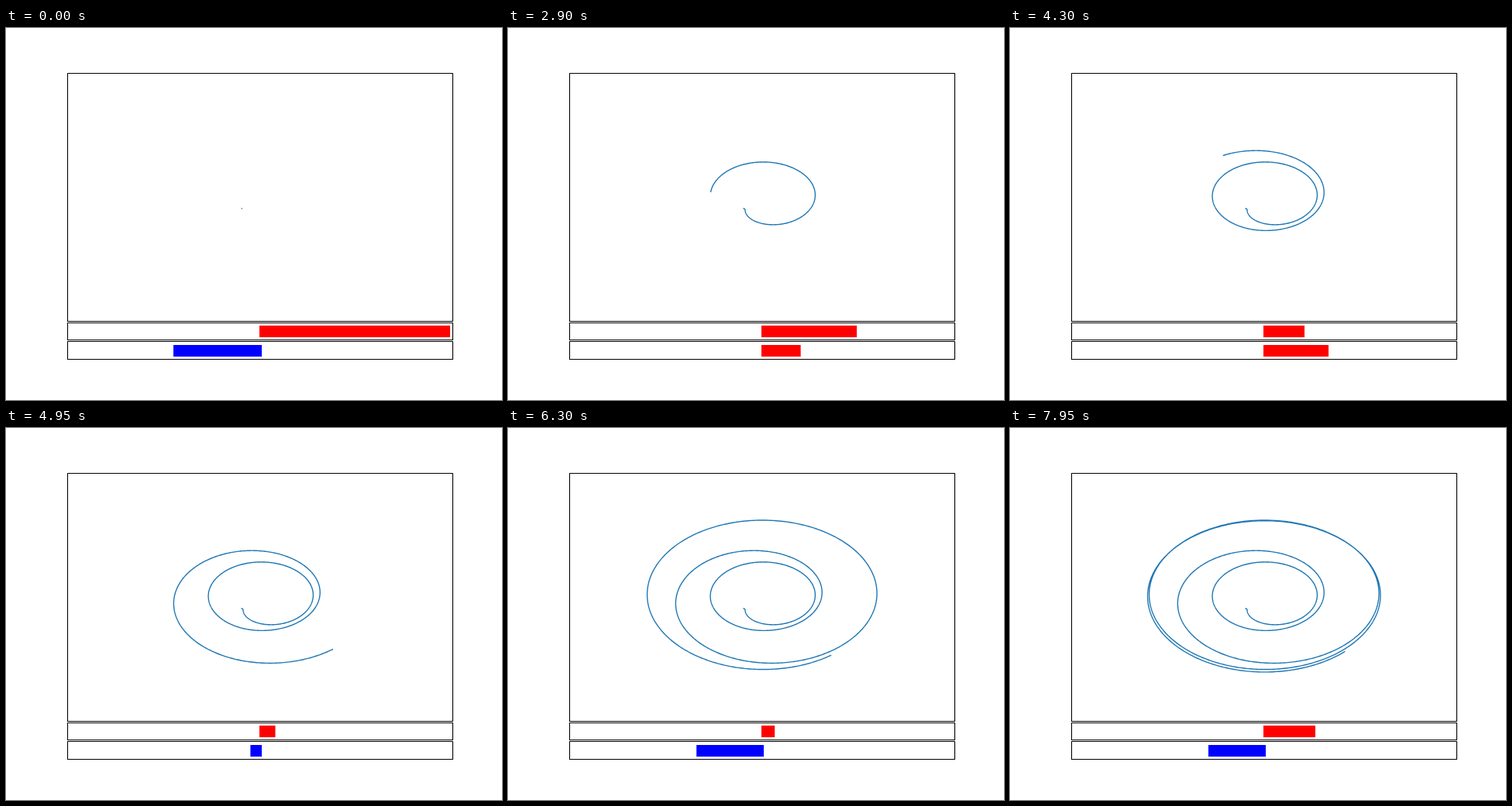
An HTML page with a canvas that plays this animation: 640x480 px, repeating every 8000 ms.

```html
<!DOCTYPE html>
<html lang="en">
<head>
<meta charset="utf-8">
<title>Spiral orbit with control bars</title>
<style>
  html, body { margin: 0; width: 100%; height: 100%; overflow: hidden; background: #fff; }
  canvas { display: block; }
</style>
</head>
<body>
<canvas id="stage" width="640" height="480"></canvas>
<script>
const ctx = document.getElementById('stage').getContext('2d');
const LOOP = 8000, STEP = 50;
const CX = 328, CY = 218, RX = 248, RY = 160;
const START = -136;      // angles are in degrees, counterclockwise
const SPIN = 222;        // cruising speed, degrees per second
const SPIN_UP = 3.04;    // seconds until cruising speed

// Bar ends: seconds, pixels from the zero line.
const topKeys = [[2, 243], [2.9, 120], [5.5, -10], [7.95, 64]];
const lowKeys = [[0, -111], [0.85, -89], [1.95, 25], [4.3, 81], [5.5, -90], [7.95, -71]];

const rad = deg => deg * Math.PI / 180;

function smooth(from, to, x) {
  const u = Math.min(1, Math.max(0, (x - from) / (to - from)));
  return u * u * (3 - 2 * u);
}

function along(keys, x) {
  if (x <= keys[0][0]) return keys[0][1];
  const i = keys.findIndex(k => k[0] >= x);
  const [x0, y0] = keys[i - 1], [x1, y1] = keys[i];
  return y0 + (y1 - y0) * (x - x0) / (x1 - x0);
}

// Linear spin-up, then constant speed with one surge while the orbit widens.
function angle(s) {
  const ramp = Math.min(s, SPIN_UP);
  const turned = SPIN * (ramp * ramp / (2 * SPIN_UP) + s - ramp);
  return START + turned + 102 * smooth(4.2, 5.8, s);
}

// A small off-centre orbit widens to a large one, overshoots and settles.
function radius(a) {
  const pull = Math.min(0.134, 0.112 * Math.exp(-(a + 123) / 48));
  const inner = 0.277 + 0.007 * Math.cos(rad(a)) + 0.006 * Math.sin(rad(a)) - pull;
  const d = Math.max(0, a - 805);
  const outer = 0.598 + 0.00002 * d
    + 0.021 * Math.cos(rad(d)) * Math.exp(-((d / 400) ** 2));
  return inner + (outer - inner) * smooth(270, 805, a);
}

function drawPath(s) {
  const end = angle(s);
  const lineTo = a => {
    const r = radius(a);
    ctx.lineTo(CX + RX * r * Math.cos(rad(a)), CY - RY * r * Math.sin(rad(a)));
  };
  ctx.beginPath();
  for (let a = START; a < end; a++) lineTo(a);
  lineTo(Math.max(end, START + 0.5));
  ctx.strokeStyle = '#1f77b4';
  ctx.lineWidth = 1.4;
  ctx.lineCap = 'square';
  ctx.lineJoin = 'round';
  ctx.stroke();
}

function drawBar(value, y) {
  ctx.fillStyle = value < 0 ? '#00f' : '#f00';
  ctx.fillRect(327 + Math.min(value, 0), y, Math.abs(value) + 3, 15);
}

function drawFrame(y, h) {
  ctx.strokeStyle = '#000';
  ctx.lineWidth = 1.1;
  ctx.strokeRect(79.5, y + 0.5, 497, h);
}

function draw(ms) {
  const s = Math.floor((ms % LOOP) / STEP) * STEP / 1000;
  ctx.fillStyle = '#fff';
  ctx.fillRect(0, 0, 640, 480);
  drawPath(s);
  drawBar(along(topKeys, s), 384);
  drawBar(along(lowKeys, s), 409);
  drawFrame(58, 320);
  drawFrame(380, 22);
  drawFrame(404, 23);
}

let start;
function tick(now) {
  if (start === undefined) start = now;
  draw(now - start);
  requestAnimationFrame(tick);
}
draw(0);
requestAnimationFrame(tick);
</script>
</body>
</html>
```
